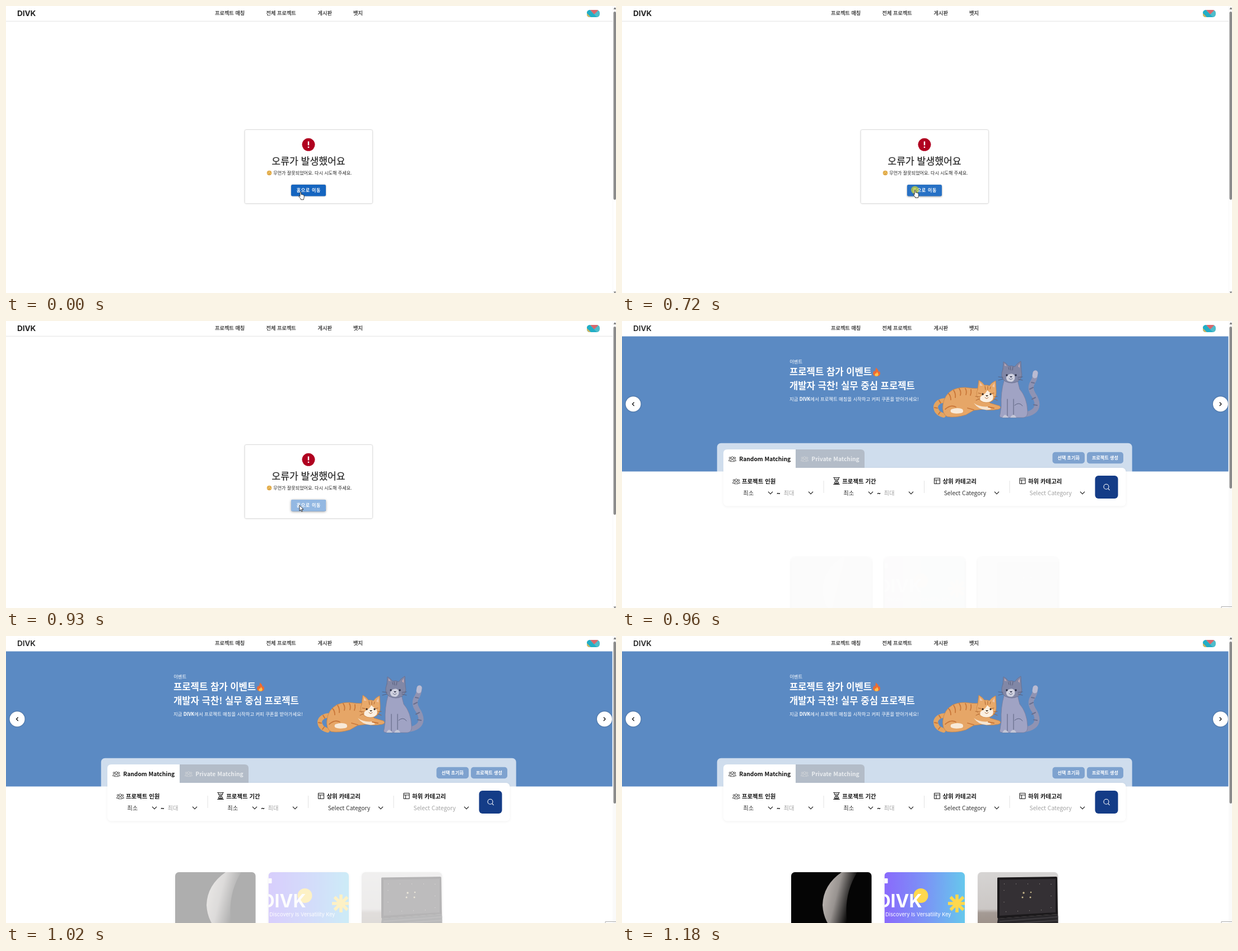
An HTML page that plays this animation: 1089x514 px, repeating every 1.49 s.

```html
<!DOCTYPE html>
<html lang="ko">
<head>
<meta charset="utf-8">
<style>
  html, body { margin: 0; width: 100%; height: 100%; overflow: hidden; background: #fff; }
  svg { display: block; font-family: "Noto Sans CJK KR", "Noto Sans CJK SC", "Noto Sans CJK JP", "Noto Sans CJK", sans-serif; }
  text { white-space: pre; }
  .m { text-anchor: middle; }
  .b { font-weight: 700; }
  .med { font-weight: 500; fill: #222; stroke: #222; stroke-width: .2; }
  .inter { font-family: Inter, sans-serif; }
  .line { fill: none; stroke: #222; stroke-width: 1.1; stroke-linecap: round; stroke-linejoin: round; }
  .thin { stroke-width: .75; }
  .lift { filter: drop-shadow(0 .7px .8px #0006); }
  .soft { filter: drop-shadow(0 1px 2px #0000000f); }
  .cat { stroke-linecap: round; stroke-linejoin: round; }
</style>
</head>
<body>
<svg width="1089" height="514" viewBox="0 0 1089 514">
  <defs>
    <clipPath id="btnClip"><rect x="509" y="320" width="62" height="20.5" rx="2.5"/></clipPath>
    <clipPath id="cardClip"><rect width="143.5" height="110" rx="6.5"/></clipPath>
    <clipPath id="avatarClip"><rect x="1037" y="7" width="23" height="13" rx="5.5"/></clipPath>
    <linearGradient id="moon" gradientUnits="userSpaceOnUse" x1="58" y1="50" x2="106" y2="62"><stop stop-color="#b5afab"/><stop offset=".4" stop-color="#989390"/><stop offset="1" stop-color="#050505"/></linearGradient>
    <linearGradient id="promo"><stop stop-color="#8a6afc"/><stop offset=".5" stop-color="#7b93f6"/><stop offset="1" stop-color="#66c8ec"/></linearGradient>
    <linearGradient id="desk" x2="0" y2="1"><stop stop-color="#d6d4d3"/><stop offset=".6" stop-color="#cbc7c5"/><stop offset=".66" stop-color="#a59b95"/><stop offset="1" stop-color="#94897f"/></linearGradient>
    <g id="people" class="line thin">
      <circle cx="7" cy="3" r="2.2"/><circle cx="2.8" cy="3.2" r="1.5"/><circle cx="11.2" cy="3.2" r="1.5"/>
      <path d="M3.7 9.3q0-3.3 3.3-3.3t3.3 3.3zM3.4 8.6H.5q0-3 2.5-3M10.6 8.6h2.9q0-3-2.5-3"/>
    </g>
    <path id="hourglass" class="line" d="M0 .5h11M0 12.5h11M1.8.5v2.5q0 1.5 3.7 3.5-3.7 2-3.7 3.5v2.5M9.2.5V3q0 1.5-3.7 3.5 3.7 2 3.7 3.5v2.5M3 11.5l2.5-2.4L8 11.5zM3.6 3.3h3.8"/>
    <path id="layout" class="line" d="M1 .5h9q.5 0 .5.5v9q0 .5-.5.5H1q-.5 0-.5-.5V1q0-.5.5-.5zM.5 3.8h10M4 3.8v6.7"/>
    <path id="down" class="line" d="M-3.7-2L0 1.8 3.7-2"/>
  </defs>

  <g id="errorPage">
    <path d="M0 27.3h1083" stroke="#dedede" stroke-width=".8"/>
    <rect class="lift" x="426.5" y="222" width="227.5" height="131.5" rx="2.5" fill="#fff"/>
    <circle cx="540" cy="248.3" r="11.5" fill="#b00020"/>
    <path d="M538.8 242.5h2.4v7h-2.4zM538.8 251.8h2.4v2.3h-2.4z" fill="#fff"/>
    <text class="m med" x="540" y="284" font-size="17.2">오류가 발생했어요</text>
    <g stroke-width=".7" fill="none" stroke="#8a5a20">
      <circle cx="470" cy="299" r="4" fill="#f3c15c" stroke="#d99a3c"/>
      <path d="M467.5 298l1.6-.8M472.5 298l-1.6-.8M468.3 301.4q1.7-2 3.4 0"/>
    </g>
    <text x="477.2" y="302" font-size="8.1" fill="#222">무언가 잘못되었어요. 다시 시도해 주세요.</text>
    <rect id="button" x="509" y="320" width="62" height="20.5" rx="2.5" fill="#1565c0"/>
    <g clip-path="url(#btnClip)" fill="#fff">
      <rect id="hover" x="509" y="320" width="62" height="20.5"/>
      <circle id="ripple"/>
    </g>
    <text class="m b" x="540.4" y="333.4" font-size="8" letter-spacing=".71" fill="#fff">홈으로 이동</text>
    <circle id="click" cx="523" cy="329.5" r="7" fill="#d8dc28" opacity=".65"/>
    <path id="hand" d="M2.2 6.8V1.2q0-1.2 1-1.2t1 1.2v3.2q1.6-.4 2 .5 1.4-.4 1.8.6 1.5-.2 1.5 1.4v3q0 1.3-.8 2.3v1.6H3.6v-1.5Q1.7 10.8.2 8.3q-.4-1 .4-1.3t1.6 1.2z" fill="#fff" stroke="#111" stroke-width=".8"/>
    <path id="arrow" d="M524 330v10l2.3-2.1 1.6 3.5 1.5-.7-1.6-3.4h3.2z" fill="#fff" stroke="#111" stroke-width=".8"/>
    <path d="M1083.5 0v514" stroke="#f7f7f7"/>
    <rect x="1084.5" y="10" width="4.5" height="337" rx="2.2" fill="#8b8b8b"/>
    <path d="M1084.5 511.5h5l-2.5 3z" fill="#777"/>
    <text class="inter b" x="20" y="17.7" font-size="13.5" fill="#222">DIVK</text>
  </g>

  <g id="homePage">
    <rect y="27.5" width="1082.5" height="242" fill="#5b8ac3"/>
    <g fill="#fff">
      <text x="299.2" y="76" font-size="8.3">이벤트</text>
      <text class="b" x="299" y="97" font-size="16.65">프로젝트 참가 이벤트</text>
      <text class="b" x="299" y="122" font-size="16.65">개발자 극찬! 실무 중심 프로젝트</text>
      <text x="299" y="143" font-size="8.35">지금 <tspan class="b">DIVK</tspan>에서 프로젝트 매칭을 시작하고 커피 쿠폰을 받아가세요!</text>
    </g>
    <path d="M453 83.5q5 3 5 8l1.5-2q2 3 1.5 5.5-1 4-6.500 4t-6.500-4.500q0-3 2.500-6l.7 2.500q2-3 1.800-7.500z" fill="#ee6a31"/>
    <path d="M455 91q3.500 4 2.500 6-1 2-3 2-3.500 0-3.200-3 .5-2 1.700-2.500l.6 1q1.200-1.500 1.400-3.500z" fill="#fcc44d"/>

    <g class="cat">
      <path d="M716 168q24-3 25-18 0-9-7-19-7-11-1-21 5-8 5-17" fill="none" stroke="#8f93b3" stroke-width="9"/>
      <path d="M737 98l1-5" stroke="#b9bbd2" stroke-width="9"/>
      <path d="M738 137l-6 3M741 151l-6-1M728 122l6-3M731 110l5 1" stroke="#6a7090" stroke-width="2"/>
      <path d="M682 107q-6 20-5 46l-2 14q-3 6 5 6h37q8-1 7-12-1-24-14-39l-4-16z" fill="#a0a3c4" stroke="#777c9d" stroke-width=".8"/>
      <path d="M680 86l1-13q6 3 9 8 6-2 11 1 5-7 11-10l1 18q3 12-6 18-11 6-23 0-10-7-4-22z" fill="#8187a6" stroke="#676d8c" stroke-width=".8"/>
      <path d="M683 80v-4l4 5zM707 81l3-5v8z" fill="#c5aab4"/>
      <path d="M692 95q6-2 9 3 2 9-6 11-10-1-9-8 1-4 6-6z" fill="#d0d1df"/>
      <path d="M693 82l1 6M698 82l-1 6M690 83l1 4M691 103l3 2 3-2M680 101l-8-1M680 104l-8 2M707 101l8-1M707 104l8 2M688 140v30M699 140v30M701 151q8-7 14 1" fill="none" stroke="#535a78" stroke-width=".9"/>
      <g fill="#292d45"><circle cx="687" cy="97" r="1.7"/><circle cx="703" cy="97" r="1.7"/><path d="M692 99h5l-2.5 2.5z"/></g>
      <path d="M681 170q3-5 9 3h-11zM695 170q5-5 9 3h-11z" fill="#c4c6d6"/>
    </g>

    <g class="cat">
      <path d="M580 142q-17 0-20 11 0 12 14 16" fill="none" stroke="#e3a462" stroke-width="8"/>
      <path d="M566 142l3 5M558 155l5 1M565 167l3-4" stroke="#c97739" stroke-width="2"/>
      <path d="M573 150q2-18 18-27 15-6 30-3 12 2 22-1l14 28 17 5q4 4-2 6-17 3-27 0l-17 2-14 8q-20 6-34 3-9-5-7-21z" fill="#e6a667" stroke="#c98445" stroke-width=".8"/>
      <path d="M588 158q12-4 20 0 3 6-3 7-11 2-17-1-3-3 0-6z" fill="#f8ead9"/>
      <path d="M628 147q11 8 27 6l4 5q-19 5-31-11z" fill="#f6e4cf"/>
      <path d="M583 130q4 4 4 11M592 124q4 6 3 13M602 121q4 6 2 12M613 121q3 5 1 11M623 123q1 5-1 10M577 158q10-9 19-4M617 156l11 3M654 154l10 2" fill="none" stroke="#c97739" stroke-width="1.8"/>
      <path d="M635 122l2-16q7 4 10 9 5-1 9 1 4-6 11-9l1 18q1 12-7 18-10 6-21 0-11-8-5-21z" fill="#e8a96a" stroke="#c98445" stroke-width=".8"/>
      <path d="M639 116v-6l5 6zM661 117l4-6v8z" fill="#f0c5a8"/>
      <path d="M652 124q4 4 9 7 5 8-3 13-10 4-18-2-3-6 5-10 5-3 7-8z" fill="#fbf0e2"/>
      <path d="M648 117l1 6M653 117v6M658 118l-1 4M636 129l5 1M664 129l-4 1M648 137l3 2 3-2M639 136l-8-1M639 139l-7 3M663 136l7-1M663 139l7 3" fill="none" stroke="#a65d2a" stroke-width=".9"/>
      <g fill="#35251b"><circle cx="644" cy="131" r="1.7"/><circle cx="658" cy="131" r="1.7"/><path d="M649 133h5l-2.5 2.5z"/></g>
    </g>

    <g class="lift" fill="#fff"><circle cx="20" cy="148.8" r="13.5"/><circle cx="1068.5" cy="148.8" r="13.5"/></g>
    <path class="line" d="M21.2 146l-2.7 2.8 2.7 2.8M1067.3 146l2.7 2.8-2.7 2.8" style="stroke-width:1.5"/>

    <rect x="169.7" y="218.7" width="741" height="90" rx="7" fill="#fff" fill-opacity=".71"/>
    <rect class="soft" x="181" y="263" width="718.5" height="68.5" rx="7" fill="#fff"/>
    <path d="M181 275v-38q0-7 7-7h122v45z" fill="#fff"/>
    <path d="M310 230h116q7 0 7 7v26H310z" fill="#b3bcc8"/>
    <use href="#people" x="190" y="242"/>
    <g transform="translate(319 242)" opacity=".75" style="filter:invert(1)"><use href="#people"/></g>
    <text class="b" x="209.3" y="250.7" font-size="10.25" fill="#111">Random Matching</text>
    <text class="b" x="338.3" y="250.7" font-size="10.25" fill="#e9ecef">Private Matching</text>
    <g fill="#7ea2cf"><rect x="768.5" y="234.7" width="57.5" height="20.5" rx="5"/><rect x="830" y="234.7" width="65" height="20.5" rx="5"/></g>
    <g class="m b" font-size="8.1" fill="#fff"><text x="797.2" y="248">선택 초기화</text><text x="862.4" y="248">프로젝트 생성</text></g>

    <use href="#people" x="197" y="282"/>
    <use href="#hourglass" x="377.5" y="280"/>
    <use href="#layout" x="557" y="281"/>
    <use href="#layout" x="709.5" y="281"/>
    <g class="b" font-size="10.4" fill="#111">
      <text x="214" y="291">프로젝트 인원</text><text x="393.3" y="291">프로젝트 기간</text>
      <text x="572.5" y="291">상위 카테고리</text><text x="725" y="291">하위 카테고리</text>
      <g class="inter m"><text x="279.2" y="311.5">~</text><text x="458.5" y="311.5">~</text></g>
    </g>
    <g font-size="10.3" fill="#333">
      <text x="216.3" y="312">최소</text><text x="395.3" y="312">최소</text><text x="574.7" y="312">Select Category</text>
      <g fill="#a3a3a3"><text x="288.5" y="312">최대</text><text x="467.5" y="312">최대</text><text x="727.5" y="312">Select Category</text></g>
    </g>
    <g id="chevrons"></g>
    <path d="M360 286v22M539.5 286v22M692 286v22" stroke="#e2e2e2"/>
    <rect x="844.5" y="277" width="41" height="41" rx="6" fill="#143c87"/>
    <g class="line" style="stroke:#fff"><circle cx="864.5" cy="296.8" r="4.5"/><path d="M868 300.3l2.3 2.3"/></g>

    <g class="soft" fill="#fdfdfd"><rect x="302" y="423" width="143.5" height="110" rx="6.5"/><rect x="468.5" y="423" width="143.5" height="110" rx="6.5"/><rect x="635" y="423" width="143.5" height="110" rx="6.5"/></g>
    <g id="photos">
      <g transform="translate(302 423)" clip-path="url(#cardClip)">
        <rect width="144" height="110" fill="#050505"/>
        <path d="M90 0Q57 23 56 59q1 18 9 32l5 19h34Q88 48 118 0z" fill="url(#moon)"/>
      </g>
      <g transform="translate(468.5 423)" clip-path="url(#cardClip)">
        <rect width="144" height="110" fill="url(#promo)"/>
        <rect x="-2" y="11" width="8" height="9" rx="1" fill="#fff"/>
        <circle cx="65" cy="42" r="13" fill="#ffd84d"/>
        <g class="inter" fill="#fff" text-anchor="end">
          <text class="b" x="67" y="62.5" font-size="32">DIVK</text>
          <text x="119" y="78.5" font-size="9.2">Discovery Is Versatility Key</text>
        </g>
        <path d="M129.5 40v32M113.5 56h32M118 44.5l23 23M141 44.5l-23 23" stroke="#ffd84d" stroke-width="5.5"/>
      </g>
      <g transform="translate(635 423)" clip-path="url(#cardClip)">
        <rect width="144" height="110" fill="url(#desk)"/>
        <path d="M36 9.5L140 8q2 0 2 2l1 65-106 8q-2 0-2-2V11q0-1.5 1-1.5z" fill="#1b191b"/>
        <path d="M39 13.5L139 12v60L39 78z" fill="#343034"/>
        <path d="M36 83l107-8 1 6v30H32z" fill="#29272a"/>
        <path d="M39 88l105-8M36 94l108-8" stroke="#464347" stroke-width="1.5"/>
        <path d="M47 21h84v46l-84 4z" fill="none" stroke="#aaa49c" stroke-dasharray="1 20"/>
        <g fill="#c8b98d"><circle cx="82" cy="37" r="1.7"/><circle cx="94" cy="45" r="1.5"/><circle cx="80" cy="45" r="1.5"/><circle cx="95" cy="36" r="1.3"/></g>
      </g>
    </g>
    <rect x="1083" width="6" height="514" fill="#fafafa"/>
    <rect x="1084.5" y="10" width="4.5" height="290" rx="2.2" fill="#8b8b8b"/>
    <path d="M1070 514v-2.5h19" fill="none" stroke="#aaa"/>
    <text class="inter" font-weight="600" x="20" y="17.7" font-size="13.5" fill="#222">DIVK</text>
  </g>

  <g class="med" font-size="9.2">
    <text x="373" y="16">프로젝트 매칭</text><text x="464.5" y="16">전체 프로젝트</text>
    <text x="556.5" y="16">게시판</text><text x="620" y="16">뱃지</text>
  </g>
  <g clip-path="url(#avatarClip)">
    <rect x="1037" y="7" width="23" height="13" fill="#4fbccb"/>
    <path d="M1037 7h5l13 13h-18z" fill="#22aec6"/>
    <path d="M1043 7h15l-8 8z" fill="#d9686c"/>
    <path d="M1037 13l7 7h-7z" fill="#d9b65c"/>
  </g>
  <path d="M1084.5 6h5l-2.5-4z" fill="#777"/>
</svg>
<script>
  const LOOP = 1490, NAVIGATE = 960;
  const $ = id => document.getElementById(id);
  const show = (id, on) => $(id).setAttribute('display', on ? 'inline' : 'none');
  const set = (id, attrs) => { for (const k in attrs) $(id).setAttribute(k, attrs[k]); };
  const progress = (t, from, length) => Math.min(1, Math.max(0, (t - from) / length));
  const mix = (a, b, p) => a + (b - a) * p;
  const smooth = p => p * p * (3 - 2 * p);

  // cubic-bezier(0, 0, .2, 1)
  function decelerate(x) {
    let lo = 0, hi = 1;
    for (let i = 0; i < 20; i++) {
      const s = (lo + hi) / 2;
      if (.6 * (1 - s) * s * s + s ** 3 < x) lo = s; else hi = s;
    }
    return 3 * (1 - lo) * lo * lo + lo ** 3;
  }

  $('chevrons').innerHTML = [265, 337, 444, 516, 669, 822]
    .map(x => `<use href="#down" x="${x}" y="308"/>`).join('');

  function draw(t) {
    show('errorPage', t < NAVIGATE);
    show('homePage', t >= NAVIGATE);

    const hover = smooth(progress(t, 20, 210));
    const press = progress(t, 725, 250);
    const grow = decelerate(press);
    const lift = hover + press * .5;
    set('hover', { opacity: .08 * hover });
    set('ripple', {
      cx: mix(523, 540, grow), cy: mix(329.5, 330.2, grow), r: 32.7 * grow,
      opacity: .5 * decelerate(progress(t, 725, 100))
    });
    $('button').style.filter = `drop-shadow(0 ${.8 + .7 * lift}px ${.8 + .8 * lift}px #0006)`;

    const move = progress(t, 20, 120);
    set('hand', { transform: `translate(${mix(522.7, 520, move)} ${mix(333, 329.7, move)})` });
    show('hand', t < 900);
    show('arrow', t >= 900);
    show('click', t >= 720 && t < 810);

    set('photos', { opacity: progress(t, 960, 195) });
  }

  function tick(now) {
    draw(now % LOOP);
    requestAnimationFrame(tick);
  }
  draw(0);
  requestAnimationFrame(tick);
</script>
</body>
</html>
```
